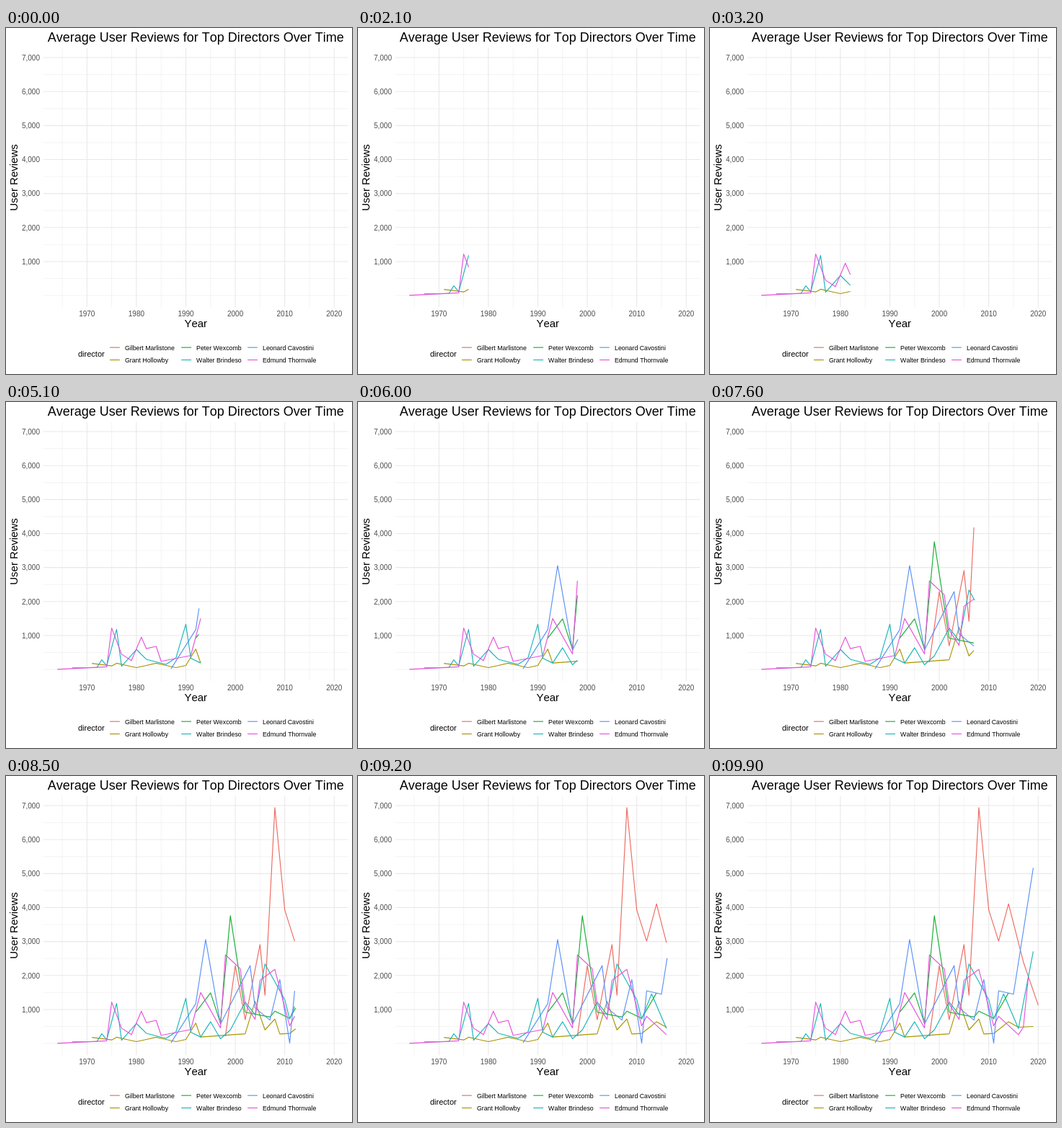
These frames come from a looping animation (480 px wide and 480 px high, 10000 ms). An HTML page:

```html
<!DOCTYPE html>
<html lang="en">
<head>
<meta charset="utf-8">
<title>Average User Reviews</title>
<style>
  html, body { margin: 0; width: 100%; height: 100%; overflow: hidden; background: #fff; }
  svg { display: block; width: 100vw; height: 100vh; }
  text { font-family: "Liberation Sans", Arial, sans-serif; font-kerning: none; }
</style>
</head>
<body>
<svg id="chart" viewBox="0 0 480 480"></svg>
<script>
const FRAMES = 100, FRAME_MS = 100;
const FIRST = 1964, LAST = 2020;
const PANEL = { left: 52, right: 474.5, top: 27.7, bottom: 387.3 };
const GRID = "#E8E8E8", LINE_WIDTH = 1.15;

const range = (from, to, step) =>
  Array.from({ length: Math.floor((to - from) / step) + 1 }, (_, i) => from + i * step);

// A slow swell around a low level, one point every two years.
const swell = (from, to, level, height, period) =>
  range(from, to, 2).map(year =>
    [year, level + height * Math.cos((year - from) / period * 2 * Math.PI)]);

// Turning points only: [year, average reviews].
const directors = [
  { name: "Gilbert Marlistone", color: "#EF6A61", points: [
    [1998, 210], [2000, 2290], [2002, 700], [2005, 2910], [2006, 1420], [2008, 6940],
    [2010, 3930], [2012, 3010], [2014, 4110], [2017, 2400], [2020, 1130]] },
  { name: "Grant Hollowby", color: "#A99400", points: [
    [1971, 180], [1975, 105], ...swell(1976, 1990, 120, 65, 8), [1992, 600], [1993, 190],
    [2002, 285], [2004, 1240], [2006, 400], [2008, 720], [2009, 280], [2011, 295],
    [2014, 640], [2016, 480], [2019, 500]] },
  { name: "Peter Wexcomb", color: "#14B030", points: [
    [1992, 920], [1995, 1490], [1997, 600], [1999, 3760], [2002, 920], [2007, 780],
    [2008, 950], [2011, 740], [2014, 1490]] },
  { name: "Walter Brindeso", color: "#18B5B9", points: [
    [1967, 50], [1972, 55], [1973, 285], [1974, 110], [1976, 1180], [1977, 95],
    [1980, 590], [1982, 300], [1986, 150], [1988, 340], [1990, 1330], [1991, 330],
    [1993, 190], [1995, 640], [1997, 140], [1999, 400], [2002, 1220], [2004, 850],
    [2006, 2340], [2010, 1290], [2011, 720], [2013, 1460], [2016, 440], [2019, 2710]] },
  { name: "Leonard Cavostini", color: "#5B91F8", points: [
    [1987, 20], [1992, 1170], [1994, 3060], [1997, 570], [2003, 2290], [2004, 1050],
    [2007, 690], [2009, 1880], [2011, 10], [2012, 1550], [2015, 1450], [2019, 5170]] },
  { name: "Edmund Thornvale", color: "#E752DC", points: [
    [1964, 5], [1974, 80], [1975, 1220], [1977, 450], [1979, 260], [1981, 950],
    [1982, 615], [1984, 680], [1985, 240], [1991, 410], [1993, 1500], [1997, 460],
    [1998, 2610], [2001, 2200], [2002, 1160], [2004, 710], [2005, 1860], [2008, 2180],
    [2011, 520], [2012, 800], [2016, 260], [2017, 480], [2018, 1950]] }
];

const chart = document.getElementById("chart");
const xOf = year => 112.3 + (year - 1970) * 6.86;
const yOf = value => 371.1 - value * 0.04715;
const frameOf = year => Math.round((year - FIRST) / (LAST - FIRST) * (FRAMES - 1));

function add(tag, attrs, content = "") {
  const node = document.createElementNS("http://www.w3.org/2000/svg", tag);
  for (const key in attrs) node.setAttribute(key, attrs[key]);
  node.textContent = content;
  return chart.appendChild(node);
}

function line(x1, y1, x2, y2, stroke, width) {
  add("line", { x1, y1, x2, y2, stroke, "stroke-width": width });
}

function label(content, x, y, size, anchor = "middle", fill = "#000", extra = {}) {
  add("text", { x, y, "font-size": size, "text-anchor": anchor, fill, ...extra }, content);
}

const gridX = (year, width) => line(xOf(year), PANEL.top, xOf(year), PANEL.bottom, GRID, width);
const gridY = (value, width) => line(PANEL.left, yOf(value), PANEL.right, yOf(value), GRID, width);

function drawAxes() {
  const centerX = (PANEL.left + PANEL.right) / 2;
  const centerY = (PANEL.top + PANEL.bottom) / 2;
  [0, ...range(500, 6500, 1000)].forEach(value => gridY(value, 0.53));
  range(1965, 2015, 10).forEach(year => gridX(year, 0.53));
  range(1000, 7000, 1000).forEach(value => {
    gridY(value, 1.07);
    label(value.toLocaleString("en-US"), 47, yOf(value) + 3.7, 10, "end", "#4D4D4D");
  });
  range(1970, LAST, 10).forEach(year => {
    gridX(year, 1.07);
    label(year, xOf(year), 400, 10, "middle", "#4D4D4D");
  });
  label("Average User Reviews for Top Directors Over Time", centerX, 19, 18);
  label("Year", centerX, 415, 15);
  label("User Reviews", 0, 0, 15, "middle", "#000",
    { transform: `translate(16 ${centerY}) rotate(-90)` });
}

function drawLegend() {
  const columns = [144, 243.2, 335.1];
  label("director", 100, 456, 11, "start");
  directors.forEach(({ name, color }, i) => {
    const x = columns[i >> 1], y = 443.2 + (i % 2) * 17.28;
    line(x, y, x + 13.8, y, color, LINE_WIDTH);
    label(name, x + 20.9, y + 3.5, 8.8, "start");
  });
}

// Points become visible on whole frames; the tip moves evenly between them.
function revealed(points, frame) {
  const shown = points.filter(([year]) => frameOf(year) <= frame);
  const next = points[shown.length];
  if (shown.length && next) {
    const last = shown[shown.length - 1];
    const start = frameOf(last[0]);
    const k = (frame - start) / (frameOf(next[0]) - start);
    if (k > 0) shown.push(last.map((v, i) => v + (next[i] - v) * k));
  }
  return shown;
}

drawAxes();
drawLegend();
const paths = directors.map(({ color }) => add("polyline", {
  fill: "none", stroke: color, "stroke-width": LINE_WIDTH, "stroke-linejoin": "round"
}));

function render(time) {
  const frame = Math.floor(time / FRAME_MS) % FRAMES;
  directors.forEach(({ points }, i) => {
    const trail = revealed(points, frame).map(([year, value]) =>
      xOf(year).toFixed(2) + "," + yOf(value).toFixed(2));
    paths[i].setAttribute("points", trail.join(" "));
  });
}

const begin = performance.now();
function tick() {
  render(performance.now() - begin);
  requestAnimationFrame(tick);
}
tick();
</script>
</body>
</html>
```
